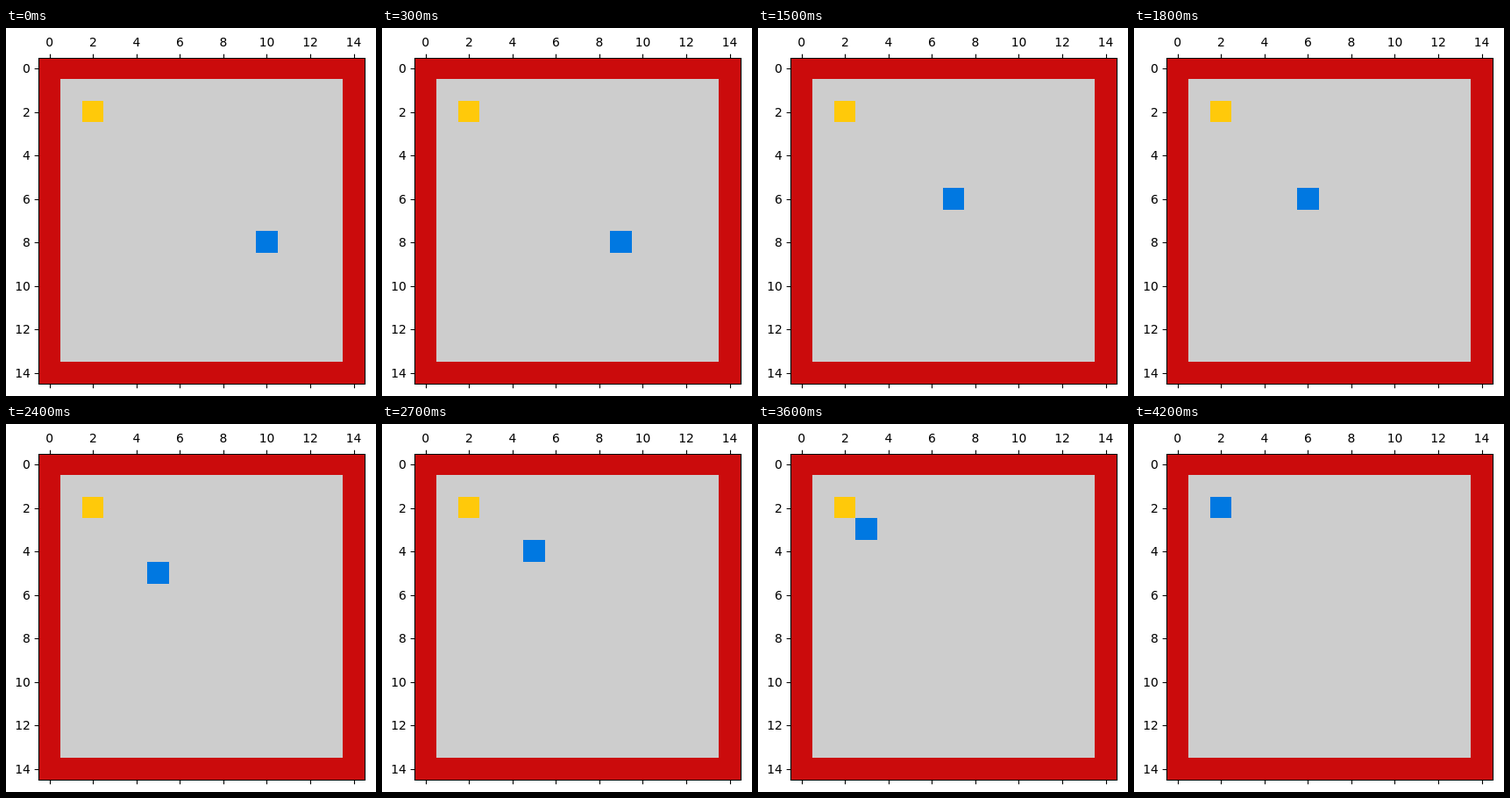
An HTML page for the animation above (4500 ms loop, 422 by 419 pixels).

```html
<!DOCTYPE html>
<html lang="en">
<head>
<meta charset="utf-8">
<title>Grid walk</title>
<style>
  html, body { margin: 0; width: 100%; height: 100%; overflow: hidden; background: #fff; }
  svg { display: block; }
  text { font: 13.889px "DejaVu Sans", sans-serif; fill: #000; }
  .cells { shape-rendering: crispEdges; }
  .axes { fill: none; stroke: #000; stroke-width: 1.11; }
</style>
</head>
<body>
<svg width="422" height="419" viewBox="0 0 422 419">
  <g class="cells" id="cells"></g>
  <path class="axes" id="axes"/>
  <g id="labels"></g>
</svg>
<script>
const STEP = 300, SIZE = 15;
const start = [10, 8], goal = [2, 2];
const $ = id => document.getElementById(id);
const edgeX = c => Math.round(37 + 24.8 * c);
const edgeY = r => Math.round(33 + 24.8 * r);

function add(parent, tag, attrs, text = '') {
  const el = document.createElementNS('http://www.w3.org/2000/svg', tag);
  for (const key in attrs) el.setAttribute(key, attrs[key]);
  el.textContent = text;
  return parent.appendChild(el);
}

function place(el, col, row, span = 1) {
  const x = edgeX(col), y = edgeY(row);
  el.setAttribute('x', x);
  el.setAttribute('y', y);
  el.setAttribute('width', edgeX(col + span) - x);
  el.setAttribute('height', edgeY(row + span) - y);
}

function cell(fill, col, row, span) {
  const el = add($('cells'), 'rect', { fill });
  place(el, col, row, span);
  return el;
}

add($('cells'), 'rect', { fill: '#cb0b0c', x: 37, y: 34, width: 372, height: 371 });
cell('#cdcdcd', 1, 1, SIZE - 2);
cell('#ffc90a', ...goal);
const walker = cell('#0078e1', ...start);

// Frame, ticks and tick labels
let d = 'M37.5 34.5H409.5V405.5H37.5Z';
for (let n = 0; n < SIZE; n += 2) {
  const cx = 37.4 + 24.77 * (n + 0.5), cy = 33.6 + 24.77 * (n + 0.5);
  const tx = Math.round(cx) + 0.5, ty = Math.round(cy) + 0.5;
  d += `M${tx} 34.5v-4.86M${tx} 405.5v4.86M37.5 ${ty}h-4.86`;
  add($('labels'), 'text', { x: cx, y: 21, 'text-anchor': 'middle' }, n);
  add($('labels'), 'text', { x: 27.8, y: Math.round(cy) + 5, 'text-anchor': 'end' }, n);
}
$('axes').setAttribute('d', d);

// Each step closes the longer distance; ties go up.
const path = [start];
for (let [x, y] = start; x > goal[0] || y > goal[1];) {
  if (x - goal[0] > y - goal[1]) x--; else y--;
  path.push([x, y]);
}

const t0 = performance.now();
function draw(now) {
  const i = Math.floor(Math.max(0, now - t0) / STEP) % path.length;
  place(walker, ...path[i]);
  requestAnimationFrame(draw);
}
draw(t0);
</script>
</body>
</html>
```
